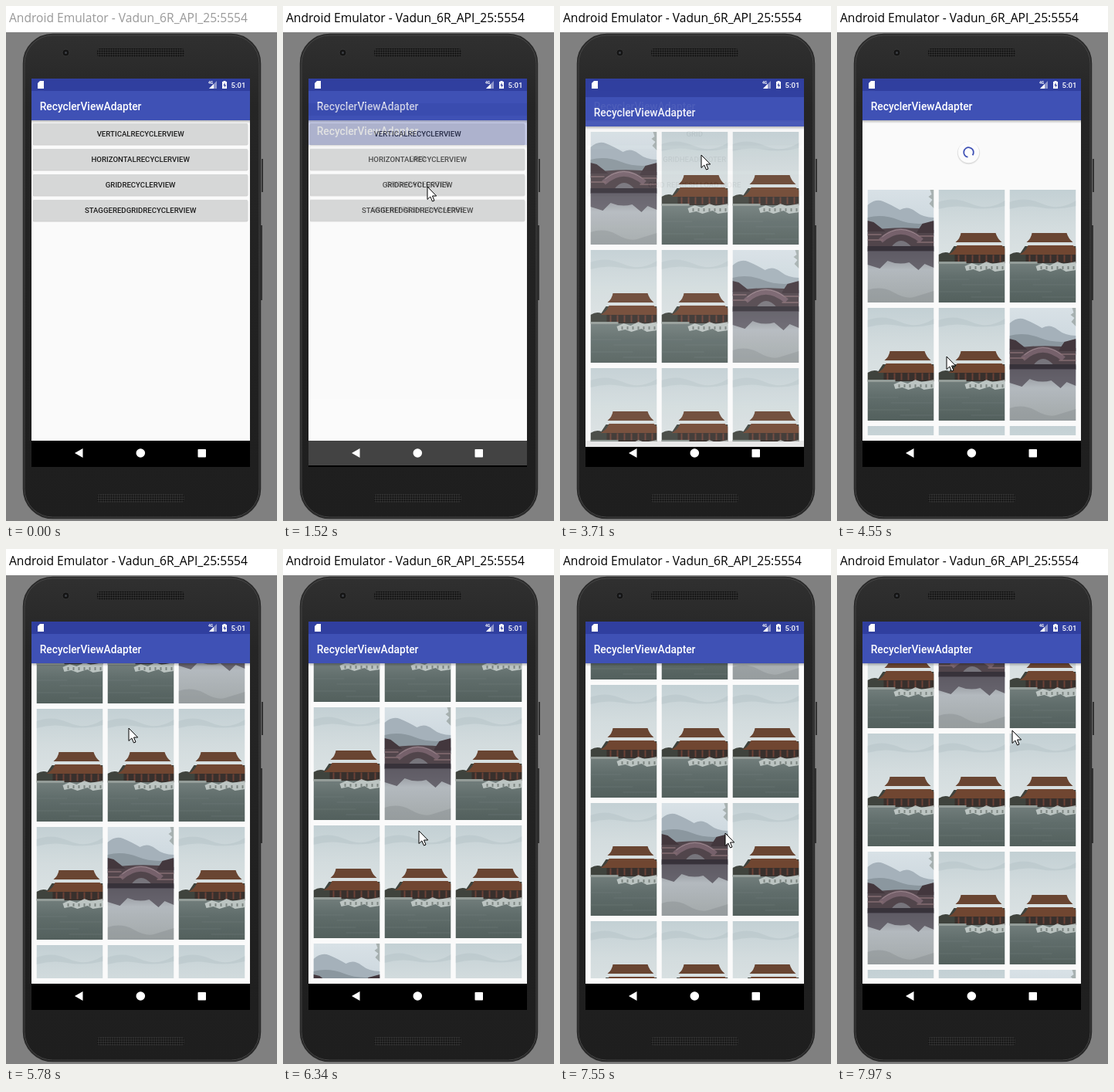
An HTML page that plays this animation: 351 by 667 pixels, repeating every 8000 ms.

```html
<!DOCTYPE html>
<html lang="en">
<head>
<meta charset="utf-8">
<title>Emulator recording</title>
<style>
html, body { margin: 0; width: 100%; height: 100%; overflow: hidden; background: #808080; }
svg { display: block; width: 351px; height: 667px; }
.caption { font: 15.6px "Open Sans", "Noto Sans", sans-serif; }
.bar { font: 500 13.77px Roboto, sans-serif; fill: #fff; }
.label { font: 500 9.64px Roboto, sans-serif; fill: #1d1d1d; text-anchor: middle; }
.clock { font: 500 9.64px Roboto, sans-serif; fill: #fff; }
.net { font: 700 5px Roboto, sans-serif; fill: #fff; }
</style>
</head>
<body>
<svg viewBox="0 0 351 667" xmlns="http://www.w3.org/2000/svg">
  <defs>
    <linearGradient id="body" x2="0" y2="1">
      <stop stop-color="#303030"/><stop offset=".15" stop-color="#252525"/><stop offset="1" stop-color="#1e1e1e"/>
    </linearGradient>
    <linearGradient id="shade" x2="0" y2="1">
      <stop stop-opacity=".26"/><stop offset="1" stop-opacity="0"/>
    </linearGradient>
    <linearGradient id="cloud" x2="0" y2="1">
      <stop stop-color="#c3d0d4"/><stop offset=".5" stop-color="#d3dcde"/><stop offset="1" stop-color="#dce3e4"/>
    </linearGradient>
    <linearGradient id="lake" x2="0" y2="1">
      <stop stop-color="#717d7b"/><stop offset=".4" stop-color="#606d6b"/><stop offset="1" stop-color="#53605d"/>
    </linearGradient>
    <linearGradient id="haze" x2="0" y2="1">
      <stop stop-color="#d8e1e6"/><stop offset="1" stop-color="#c4d0d8"/>
    </linearGradient>
    <linearGradient id="mirror" x2="0" y2="1">
      <stop stop-color="#7e7f86"/><stop offset=".4" stop-color="#b3b9be"/><stop offset="1" stop-color="#a3a9aa"/>
    </linearGradient>
    <pattern id="mesh" width="3" height="3" patternUnits="userSpaceOnUse">
      <rect width="3" height="3" fill="#303030"/><circle cx="1.5" cy="1.5" r="1.1" fill="#0c0c0c"/>
    </pattern>
    <clipPath id="screen"><rect x="33" y="94" width="283" height="503"/></clipPath>
    <clipPath id="list"><rect x="33" y="148" width="283" height="408"/></clipPath>
    <clipPath id="third"><rect x="35" y="218" width="278" height="27" rx="1.4"/></clipPath>

    <symbol id="temple" width="86" height="146" viewBox="0 0 86 146">
      <rect width="86" height="96" fill="url(#cloud)"/>
      <path d="M0 16Q20 8 42 18T86 14V21Q60 27 40 23T0 25Z" fill="#b5c3c8" opacity=".5"/>
      <path d="M0 84Q8 79 14 82L20 73H86V95H0Z" fill="#3f433d"/>
      <path d="M29 56H74Q76 63 82 68H22Q28 63 29 56Z" fill="#694532"/>
      <path d="M24 72H82L86 76V84H13Q21 80 24 72Z" fill="#704631"/>
      <path d="M21 84H86V95H21Z" fill="#38302c"/>
      <path d="M25 89H86" stroke="#6b4136" stroke-width="9" stroke-dasharray="2 7"/>
      <rect y="95" width="86" height="51" fill="url(#lake)"/>
      <path d="M0 93H36V96H0Z" fill="#939c98"/>
      <path d="M34 99L43 95 52 98 62 93 70 96 86 93V104L73 106 66 102 53 106 45 103 36 105Z" fill="#d0d7d5" opacity=".8"/>
      <path d="M40 101H86" stroke="#7c8581" stroke-width="4" stroke-dasharray="2 5"/>
      <path d="M0 116H40M30 123H86M0 132H55M42 139H86" stroke="#7a8784" opacity=".35"/>
    </symbol>

    <symbol id="bridge" width="86" height="146" viewBox="0 0 86 146">
      <rect width="86" height="80" fill="url(#haze)"/>
      <path d="M0 20Q10 11 20 15T42 26Q52 20 62 28T86 36V60H0Z" fill="#a5b1ba"/>
      <path d="M0 36Q20 31 40 39T86 42V60H0Z" fill="#8b979f"/>
      <path d="M0 53Q43 46 86 52V79H0Z" fill="#51454b"/>
      <path d="M0 40L8 42 17 49 23 54H0ZM65 53L71 44 86 40V56H64Z" fill="#43373d"/>
      <path d="M17 66Q43 42 70 66" fill="none" stroke="#76616b" stroke-width="7"/>
      <path d="M19 61Q43 42 68 61" fill="none" stroke="#9b878e"/>
      <path d="M31 74Q43 58 57 74Z" fill="#77757c"/>
      <path d="M0 58H18M0 65H20M66 60H86M64 68H86" stroke="#846c72" stroke-width="1.5"/>
      <rect y="75" width="86" height="71" fill="url(#mirror)"/>
      <path d="M0 73H86V80H0Z" fill="#37323a"/>
      <path d="M0 79H86V101L74 96 66 104 54 94Q40 98 26 92L16 102 0 97Z" fill="#56515a" opacity=".8"/>
      <path d="M0 130Q18 124 34 133T60 139L86 131V146H0Z" fill="#7e8586" opacity=".35"/>
      <path d="M86 0H81L83 6 79 9 84 13 80 18 86 24Z" fill="#7a837f" opacity=".5"/>
    </symbol>
  </defs>

  <rect width="351" height="667" fill="#808080"/>
  <rect width="351" height="34" fill="#fff"/>
  <text id="caption" class="caption" x="4" y="21">Android Emulator - Vadun_6R_API_25:5554</text>

  <path d="M331 198h2v43h-2zM330 284h2v97h-2z" fill="#333"/>
  <rect x="22.500" y="36.500" width="307" height="627" rx="38" fill="url(#body)" stroke="#2a2a2a" stroke-width="1.500"/>
  <rect x="24" y="38" width="304" height="624" rx="36.500" fill="none" stroke="#454545"/>
  <circle cx="77.500" cy="60.500" r="4.500" fill="#151515" stroke="#383838"/>
  <circle cx="77.500" cy="60.500" r="1.500" fill="#3d4046"/>
  <rect x="118" y="55" width="113" height="11" rx="4" fill="url(#mesh)"/>
  <rect x="118" y="632" width="113" height="11" rx="4" fill="url(#mesh)"/>

  <g clip-path="url(#screen)">
    <rect x="33" y="94" width="283" height="503"/>
    <g id="windows"></g>
    <g fill="#fff">
      <path d="M44 97h5v10h-8v-7z"/>
      <path d="M273 97v10h-10z" opacity=".45"/><path d="M269 101v6h-6z"/>
      <path d="M281.500 97h3v1h1.500v9h-6v-9h1.500z"/>
      <path d="M283.500 99l-2 4h1.500v3l2-4h-1.500z" fill="#303f9f"/>
      <path d="M89 579L99.500 573V585Z"/>
      <circle cx="174.300" cy="579" r="5.800"/>
      <rect x="248.500" y="574" width="10.500" height="10.500" rx=".8"/>
    </g>
    <text class="net" x="262" y="101">4G</text>
    <text class="clock" x="291.500" y="106">5:01</text>
  </g>
  <path id="cursor" d="M0 0V16.500L3.800 13 6.500 19 9 18 6.500 12H11.700Z" fill="#fff" stroke="#000" stroke-linejoin="round"/>
</svg>
<script>
const LOOP = 8000, STEP = 70.4;
const TOP = 155, PITCH = 153, COLUMN = 92;
const PULL = 83;
const SWIPE = { start: 5500, period: 731, distance: 350 };

const $ = id => document.getElementById(id);
const clamp = v => Math.min(1, Math.max(0, v));
const mix = (a, b, p) => a + (b - a) * p;
const smooth = p => p * p * (3 - 2 * p);
const ramp = (t, from, to) => smooth(clamp((t - from) / (to - from)));

const moves = [
  { from: 70, to: 660, x: 187, y: 234 },
  { from: 1880, to: 2230, x: 186, y: 188 },
  { from: 2370, to: 2510, x: 168, y: 238 },
  { from: 3150, to: 3500, x: 183, y: 193 },
  { from: 3990, to: 4550, x: 142, y: 454 },
  { from: 4720, to: SWIPE.start, x: 150, y: 425 }
];
const presses = [
  { x: 187, y: 234, down: 980, up: 1200 },
  { x: 168, y: 238, down: 2770, up: 3150 }
];

const button = (label, i) => {
  const y = 152 + 33 * i;
  return `<rect x="34.5" y="${y + .5}" width="279" height="28" rx="2" opacity=".16"/>
    <rect x="35" y="${y}" width="278" height="27" rx="1.4" fill="#d6d7d7"/>
    <text class="label" x="174.2" y="${y + 17}">${label}</text>`;
};

const ripple = i => `<g clip-path="url(#third)"><circle id="ripple${i}" cx="${presses[i].x}" cy="${presses[i].y}"/></g>`;

const appWindow = (id, content) => `<g id="${id}">
  <rect x="33" y="94" width="283" height="469" fill="#fafafa"/>${content}
  <rect x="33" y="148" width="283" height="4" fill="url(#shade)"/>
  <rect x="33" y="94" width="283" height="16" fill="#303f9f"/>
  <rect x="33" y="110" width="283" height="38" fill="#3f51b5"/>
  <text class="bar" x="43.7" y="135">RecyclerViewAdapter</text></g>`;

// Every fifth picture shows the bridge.
const photos = Array.from({ length: 39 }, (_, i) =>
  `<use href="#${i % 5 ? 'temple' : 'bridge'}" x="${39.5 + COLUMN * (i % 3)}" y="${TOP + PITCH * Math.floor(i / 3)}"/>`).join('');

const menu = ['VERTICALRECYCLERVIEW', 'HORIZONTALRECYCLERVIEW', 'GRIDRECYCLERVIEW', 'STAGGEREDGRIDRECYCLERVIEW'];
const gridMenu = ['GRID', 'GRIDHEADFOOTER', 'GRID REFRESH LOAD MORE'];

$('windows').innerHTML =
  appWindow('main', menu.map(button).join('') + ripple(0)) +
  appWindow('options', gridMenu.map(button).join('') + ripple(1)) +
  appWindow('gallery', `<g clip-path="url(#list)"><g id="photos">${photos}</g></g>
    <g id="spinner">
      <circle cy="1" r="14.8" opacity=".07"/><circle cy=".5" r="14.2" opacity=".08"/>
      <circle r="13.8" fill="#fcfcfc"/>
      <circle id="arc" r="6.3" fill="none" stroke="#3f51b5" stroke-width="1.8" stroke-dasharray="32 7.6"/>
    </g>`);

function recorded(t) {
  const origin = t < 4720 ? 1520 : 4720;
  return origin + Math.floor((t - origin) / STEP) * STEP;
}

// Each swipe speeds up under the finger and then coasts to a stop.
function swipeAt(t) {
  const turns = Math.max(0, (t - SWIPE.start) / SWIPE.period);
  const count = Math.floor(turns), phase = turns - count;
  return { phase, scroll: SWIPE.distance * (count + 1 - (1 - phase * phase) ** 8.4) };
}

function pointerAt(t, phase) {
  if (t >= SWIPE.start) {
    const reach = phase < .4 ? phase / .4 : (1 - phase) / .6;
    return { x: 150 + (t - SWIPE.start) * .0313, y: mix(425, 230, smooth(reach)) };
  }
  return moves.reduce((at, move) => {
    const p = ramp(t, move.from, move.to);
    return { x: mix(at.x, move.x, p), y: mix(at.y, move.y, p) };
  }, { x: 294, y: 18 });
}

// Opening windows fade in while rising 40 px, each on its own decelerating curve.
function openWindow(id, start, t) {
  const el = $(id), age = t - start;
  el.style.display = age > 0 ? '' : 'none';
  el.setAttribute('opacity', 1 - (1 - clamp(age / 200)) ** 4);
  el.setAttribute('transform', `translate(0 ${Math.round(40 * (1 - clamp(age / 350)) ** 5)})`);
}

function drawRipple({ down, up }, i, t) {
  const el = $('ripple' + i);
  el.setAttribute('r', t > down ? mix(15, 160, clamp((t - down) / 260)) : 0);
  el.setAttribute('opacity', .12 * (1 - ramp(t, up, up + 300)));
}

function drawSpinner(t) {
  const size = ramp(t, 3990, 4250) - ramp(t, 5100, 5300);
  const spin = t < 4550 ? t - 4550 : Math.max(0, t - 4720);
  $('spinner').style.display = size > 0 ? '' : 'none';
  $('spinner').setAttribute('transform', `translate(170.5 189.5) scale(${size})`);
  $('arc').setAttribute('transform', `rotate(${100 + spin * .3})`);
}

function render(time) {
  const t = recorded(time);
  $('caption').setAttribute('fill', time < 1000 ? '#999' : '#000');

  const swipe = swipeAt(t);
  const { x, y } = pointerAt(t, swipe.phase);
  $('cursor').style.display = time < 70 ? 'none' : '';
  $('cursor').setAttribute('transform', `translate(${Math.round(x)} ${Math.round(y)})`);

  presses.forEach((press, i) => drawRipple(press, i, t));
  openWindow('options', 1505, t);
  openWindow('gallery', 3606, t);

  const pull = PULL * (ramp(t, 3990, 4540) - ramp(t, 5250, 5560));
  $('photos').setAttribute('transform', `translate(0 ${Math.round(pull - swipe.scroll)})`);
  drawSpinner(t);
}

const begin = performance.now();
function frame() {
  render((performance.now() - begin) % LOOP);
  requestAnimationFrame(frame);
}
frame();
</script>
</body>
</html>
```
